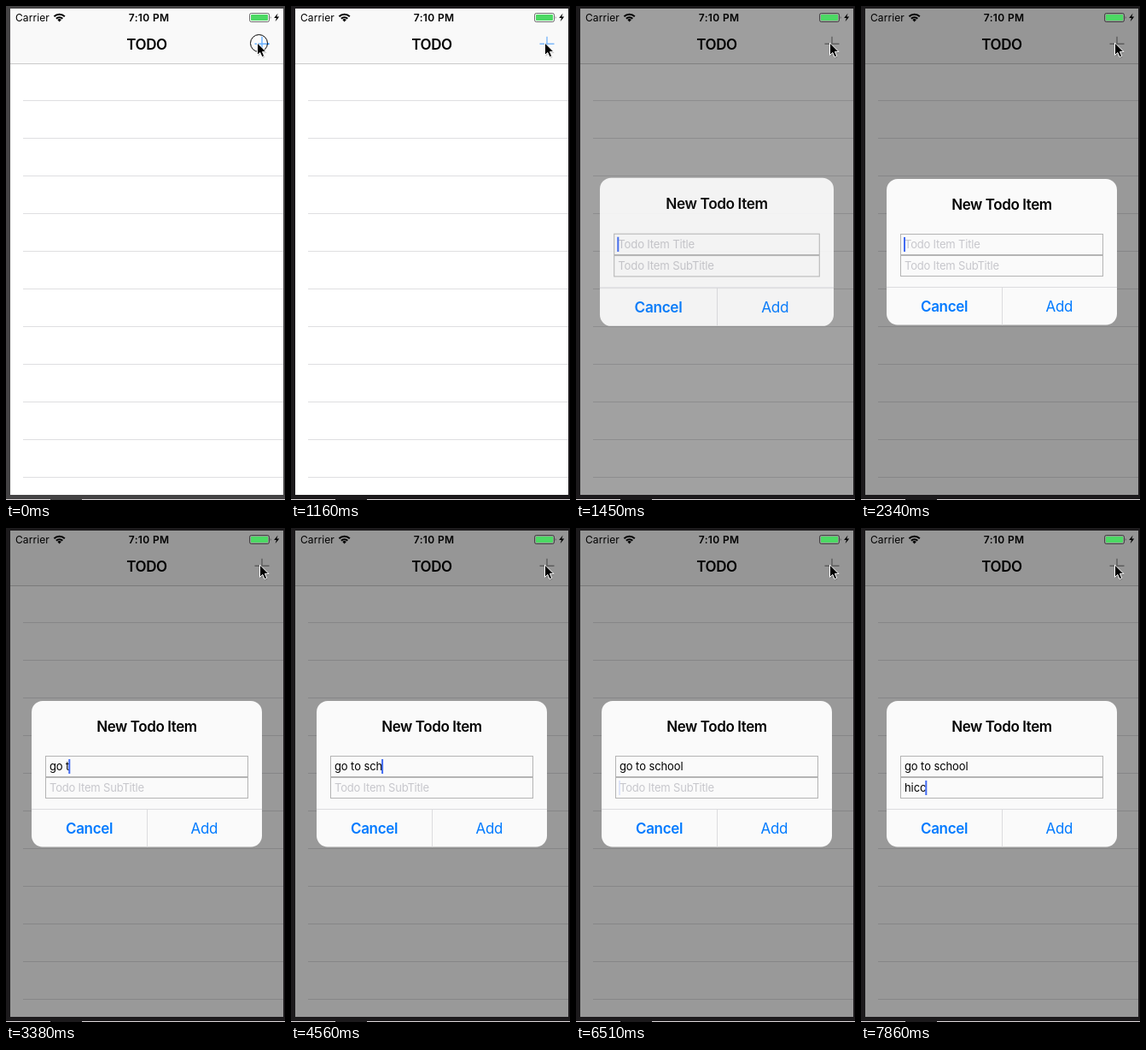
Write an HTML page that moves like this. It is 327x577 px and loops after 8 s.

```html
<!DOCTYPE html>
<html lang="en">
<head>
<meta charset="utf-8">
<title>Todo list</title>
<style>
  html, body { margin: 0; width: 100%; height: 100%; overflow: hidden; }
  svg { display: block; width: 327px; height: 577px; }
  text { font-family: Inter, Roboto, sans-serif; white-space: pre; }
  .status { font-size: 12px; }
  .heading { font-size: 17px; font-weight: 600; letter-spacing: -.41px; }
  .button { font-size: 17px; letter-spacing: -.35px; fill: #007aff; }
  .field { font-size: 13px; letter-spacing: -.1px; }
  .hint { font-size: 13px; letter-spacing: -.2px; fill: #c7c7cc; }
  .mid { text-anchor: middle; }
</style>
</head>
<body>
<svg viewBox="0 0 327 577">
  <rect id="desk" width="327" height="577"/>
  <rect y="576" width="52" height="1" fill="#ddd8da"/>
  <rect x="89" y="576" width="238" height="1" fill="#ddd8da"/>

  <rect x="5" y="3" width="320" height="568" fill="#fff"/>
  <rect x="5" y="3" width="320" height="64" fill="#f9f9f9"/>
  <rect x="5" y="67" width="320" height="1" fill="#cacaca"/>
  <g id="rows" fill="#dfdfe1"></g>
  <text class="heading mid" x="165" y="51">TODO</text>
  <path id="plus" d="M291.5 44.2H308.5M300 35.7V52.7" fill="none" stroke-width="1.4"/>
  <rect id="dim" x="5" y="3" width="320" height="568"/>

  <!-- status bar stays above the dimming layer -->
  <text class="status" x="11" y="17.7" letter-spacing=".1">Carrier</text>
  <g fill="none" stroke="#000" stroke-width="2">
    <path d="M56.4 12.2A8.8 8.8 0 0 1 68.8 12.2"/>
    <path d="M58.9 14.7A5.2 5.2 0 0 1 66.3 14.7"/>
    <path d="M62.6 18.4L60.3 16.1A3.2 3.2 0 0 1 64.9 16.1Z" fill="#000" stroke="none"/>
  </g>
  <text class="status mid" x="167.6" y="17.7" font-weight="600" letter-spacing=".35">7:10 PM</text>
  <rect x="285.5" y="8.5" width="23" height="10" rx="2" fill="none" stroke="#000" stroke-opacity=".55"/>
  <rect x="287" y="10" width="20" height="7" rx=".8" fill="#4cd964"/>
  <path d="M309.8 11.7Q311.4 13.5 309.8 15.3Z" fill="#000" fill-opacity=".6"/>
  <path d="M318.6 8.6L314.2 14H317L315.6 18.2L320.2 12.6H317.3Z"/>

  <g id="alert">
    <rect x="30" y="202" width="270" height="170.5" rx="13" fill="#fafafa"/>
    <text class="heading mid" x="165" y="238">New Todo Item</text>
    <g fill="#fafafa" stroke="#b4b4b4">
      <rect x="46.5" y="266.5" width="237" height="24"/>
      <rect x="46.5" y="291.5" width="237" height="24"/>
    </g>
    <text class="hint" x="51" y="283">Todo Item Title</text>
    <text class="hint" x="51" y="308">Todo Item SubTitle</text>
    <text class="field" x="51" y="283"></text>
    <text class="field" x="51" y="308"></text>
    <rect id="caret" width="2" height="17" fill="#426bf2"/>
    <path d="M30 328.5H300M165.5 328.5V372.5" stroke="#dcdcdf"/>
    <text class="button mid" x="97.5" y="356.7" font-weight="600">Cancel</text>
    <text class="button mid" x="232.3" y="356.7">Add</text>
  </g>

  <circle id="tap" cx="296.5" cy="43.5" r="10" fill="#fff" fill-opacity=".4" stroke="#000"/>
  <g id="cursor">
    <path d="M1 2V16L4.4 13L6.4 18L9 17L7 12H11.2Z" fill="#000" opacity=".18"/>
    <path d="M0 0V14.4L3.3 11.4L5.5 16.6L8.2 15.5L6 10.4H10.4Z"
          stroke="#fff" stroke-width="1" stroke-linejoin="round"/>
  </g>
</svg>
<script>
const LOOP = 8000;
const $ = s => document.querySelector(s);
const hints = document.querySelectorAll('.hint');
const fields = document.querySelectorAll('.field');

for (let y = 110; y < 570; y += 44)
  $('#rows').insertAdjacentHTML('beforeend', `<rect x="20" y="${y}" width="305" height="1"/>`);

// Value of the latest step at time t, from [time, value] pairs.
const at = (steps, t) => steps.reduce((v, [ms, next]) => t >= ms ? next : v, steps[0][1]);

// Builds typing steps: one more character at each time.
const typing = (word, times) => [[0, ''], ...times.map((ms, i) => [ms, word.slice(0, i + 1)])];

const reveal = [[0, 0], [1300, .15], [1450, .925], [1590, .985], [1740, .997], [1890, 1]];
const plusInk = [[0, '#007aff'], [1030, '#a9d0fb'], [1160, '#7db8fa'], [1300, '#4f9ff2'], [1450, '#999']];
const caretInk = [[0, 0], [1450, 1], [1890, .3], [2040, 0], [2340, 1], [6510, .15], [6660, 0], [6960, 1]];
const typed = [
  typing('go to school', [2480, 2630, 2930, 3380, 3530, 3670, 3970, 4260, 4560, 5010, 5160, 5310]),
  typing('hicc', [7260, 7410, 7710, 7860])
];

function draw(t) {
  const p = at(reveal, t), scale = 1.2 - .2 * p;
  $('#desk').setAttribute('fill', t < 1030 ? '#444344' : '#1c1a1c');
  $('#plus').setAttribute('stroke', at(plusInk, t));
  $('#dim').setAttribute('opacity', .4 * p);
  $('#alert').setAttribute('opacity', p);
  $('#alert').setAttribute('transform', `translate(165 287.3) scale(${scale}) translate(-165 -287.3)`);
  $('#tap').setAttribute('opacity', t < 140 ? 1 : 0);
  $('#cursor').setAttribute('transform', `translate(${t < 440 ? 294.5 : 297.5} 43)`);

  typed.forEach((steps, i) => {
    const word = at(steps, t);
    if (fields[i].textContent !== word) fields[i].textContent = word;
    hints[i].setAttribute('opacity', word ? 0 : 1);
  });

  const row = t < 5910 ? 0 : 1, field = fields[row];
  const width = field.textContent ? field.getComputedTextLength() : 0;
  $('#caret').setAttribute('x', 50 + width);
  $('#caret').setAttribute('y', row ? 295 : 270);
  $('#caret').setAttribute('opacity', at(caretInk, t));
}

const start = performance.now();
function tick() {
  draw((performance.now() - start) % LOOP);
  requestAnimationFrame(tick);
}
tick();
</script>
</body>
</html>
```
